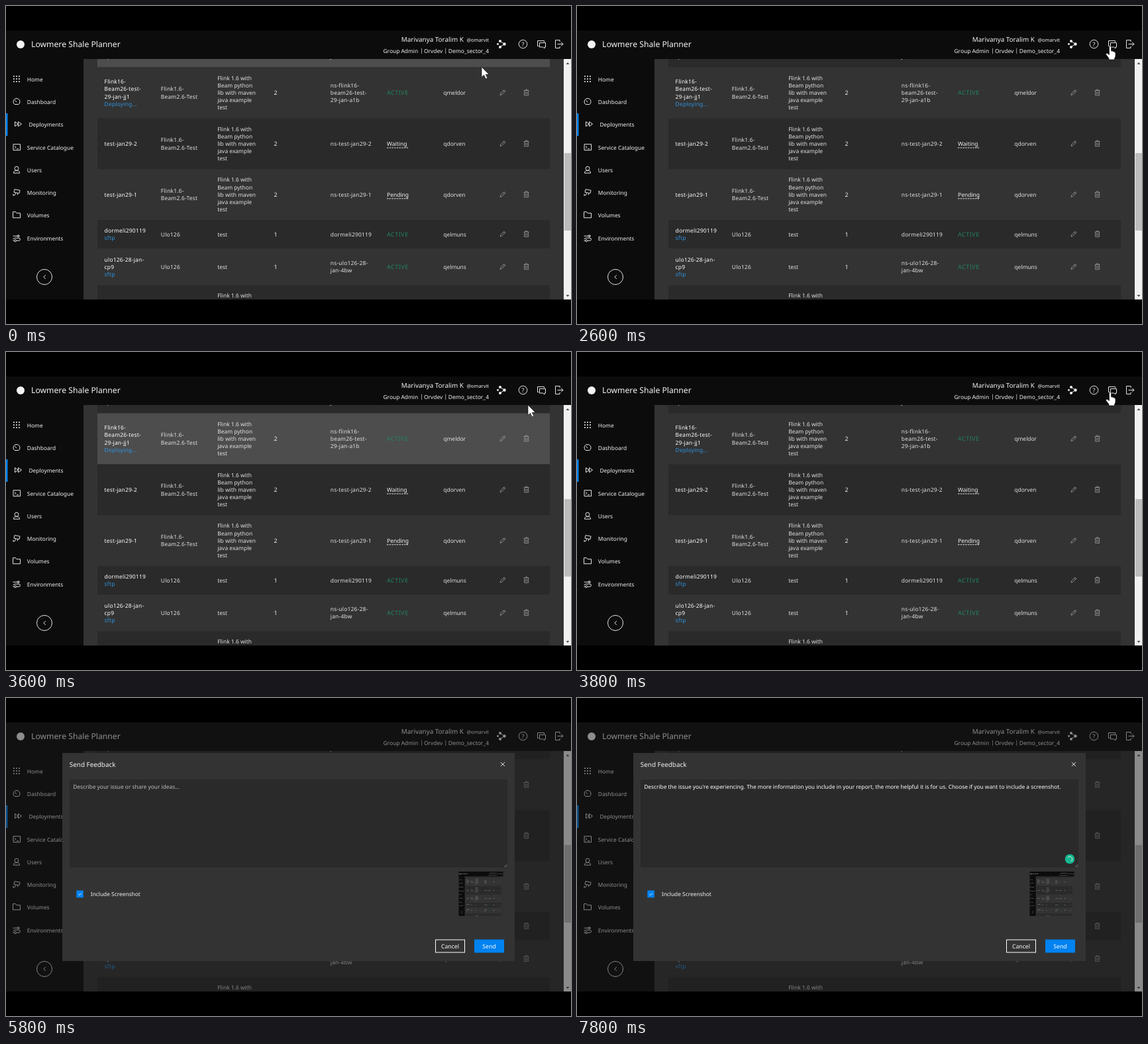
These frames come from a looping animation (853 by 480 pixels, 8 s). An HTML page:

```html
<!DOCTYPE html>
<html lang="en">
<head>
<meta charset="utf-8">
<title>Send feedback</title>
<style>
html, body { margin: 0; width: 100%; height: 100%; overflow: hidden; background: #000; }
svg { display: block; width: 100%; height: 100%; font-family: "Noto Sans", "Open Sans", sans-serif; text-rendering: geometricPrecision; }
text { white-space: pre; }
.line { fill: none; stroke: #e4e4e4; stroke-width: 1; }
.tool { fill: none; stroke: #a2a2a2; stroke-width: .8; }
</style>
</head>
<body>
<svg id="stage" viewBox="0 0 853 480"></svg>
<script>
const LOOP = 8000, STEP = 200;
const WHITE = '#f4f4f4', SOFT = '#e2e2e2', BLUE = '#0082f0', LINK = '#2f94e0', GREEN = '#21855d';
const LIGHT = '#333', DARK = '#2a2a2a', HOVER = '#4d4d4d', BASE = '#0c0c0c';

// y is the middle of the line
const text = (x, y, s, size = 8.4, fill = WHITE, more = '') =>
  `<text x="${x}" y="${y + size * .36}" font-size="${size}" fill="${fill}" ${more}>${s}</text>`;
const rect = (x, y, w, h, fill, more = '') =>
  `<rect x="${x}" y="${y}" width="${w}" height="${h}" fill="${fill}" ${more}/>`;
const path = (d, cls = 'line', more = '') => `<path class="${cls}" d="${d}" ${more}/>`;
const dot = (x, y, r, more = `fill="${WHITE}"`) => `<circle cx="${x}" cy="${y}" r="${r}" ${more}/>`;
const ring = (x, y, r) => dot(x, y, r, 'class="line"');
const at = (x, y, body) => `<g transform="translate(${x} ${y})">${body}</g>`;
const END = 'text-anchor="end"', MID = 'text-anchor="middle"', WIDE = 'letter-spacing=".2"';

// Header
function header() {
  const nodes = path('M746 53 752.5 57.5 746 62') +
    dot(746, 53, 2) + dot(752.5, 57.5, 2.2) + dot(746, 62, 2) + dot(742.5, 57.5, 1.4);
  const chat = path('M804.5 60.5H802.500V52.500H812.500V54.500M805.500 55.500H814.500V62H813V64L810.500 62H805.500Z');
  const exit = path('M836 54V51.500H829.500V63.500H836V61M832.500 57.500H841M838 54.500 841 57.500 838 60.500');
  return rect(0, 37, 853, 43, BASE) + dot(22, 58, 6) +
    text(38, 58, 'Lowmere Shale Planner', 12.2) +
    text(691, 50, 'Marivanya Toralim K', 9.9, WHITE, END) +
    text(729, 51, '@omarvit', 7.4, WHITE, END) +
    text(569.5, 67.5, 'Group Admin') + text(625, 67, '|') + text(631, 67.5, 'Orvdev') +
    text(661.500, 67, '|') + text(729, 67.5, 'Demo_sector_4', 8.5, WHITE, END) +
    nodes + ring(780.5, 57.5, 6.3) + text(780.5, 57.5, '?', 9, WHITE, MID) + chat + exit;
}

// Side menu, icons drawn around their own centre
const grid = [-4, 0, 4].map(x => [-4, 0, 4].map(y => rect(x - 1, y - 1, 1.8, 1.8, SOFT)).join('')).join('');
const menu = [
  ['Home', grid],
  ['Dashboard', path('M-3 4.300A5 5 0 1 1 3 4.300ZM0 1-2.500-2')],
  ['Deployments', path('M-2.500-3.500 2.500 0-2.500 3.500ZM2.500-3.500 7.500 0 2.500 3.500Z')],
  ['Service Catalogue', path('M-5-4.500H5.500V4.500H-5ZM-3-2-1 0-3 2M0 2.500H3')],
  ['Users', ring(0, -2, 3) + path('M-4.500 5C-4.500 1-2 1.500 0 1.500S4.500 1 4.500 5Z')],
  ['Monitoring', path('M-3-4.500 5-3 4 1.500-4 0ZM-1 1-3 4.500H-5.500M-5 2.500V5M1.500 1.500V4')],
  ['Volumes', path('M-5.500 4.500V-4.500H-1.500L0-2.500H5.500V4.500Z')],
  ['Environments', path('M-5.500-3H1M4.500-3H2M-2 0H3Q5.500 0 5.500 2T3 4H0M-5.500 4H-4M-2 0Q-5 0-5 2') +
    ring(2.5, -3, 1.5) + ring(-2, 4, 1.5)]
];
function sidebar() {
  const items = menu.map(([name, icon], i) => {
    const y = 111 + i * 34.22, on = i === 2;
    return text(on ? 34.4 : 31.8, y, name) + at(16, Math.round(y) - .8, icon);
  });
  return rect(0, 80, 117, 363, BASE) + rect(0, 162, 2.5, 34, BLUE) + items.join('') +
    ring(58, 409, 11.5) + path('M59.800 406 56.800 409 59.800 412');
}

// Table
const flink = ['Flink1.6-', 'Beam2.6-Test'];
const about = ['Flink 1.6 with', 'Beam python', 'lib with maven', 'java example', 'test'];
const rows = [
  { y: 92.5, h: 77, name: ['Flink16-', 'Beam26-test-', '29-jan-jj1'], note: 'Deploying...', kind: flink, info: about,
    n: 2, space: ['ns-flink16-', 'beam26-test-', '29-jan-a1b'], state: 'ACTIVE', owner: 'qmeldor' },
  { y: 169.5, h: 77, name: ['test-jan29-2'], kind: flink, info: about,
    n: 2, space: ['ns-test-jan29-2'], state: 'Waiting', owner: 'qdorven' },
  { y: 246.5, h: 76.5, name: ['test-jan29-1'], kind: flink, info: about,
    n: 2, space: ['ns-test-jan29-1'], state: 'Pending', owner: 'qdorven' },
  { y: 323, h: 43, name: ['dormeli290119'], note: 'sftp', kind: ['Ulo126'], info: ['test'],
    n: 1, space: ['dormeli290119'], state: 'ACTIVE', owner: 'qelmuns' },
  { y: 366, h: 55.5, name: ['ulo126-28-jan-', 'cp9'], note: 'sftp', kind: ['Ulo126'], info: ['test'],
    n: 1, space: ['ns-ulo126-28-', 'jan-4bw'], state: 'ACTIVE', owner: 'qelmuns' }
];
const cell = (x, mid, lines, fill, more) => lines.map((s, i) =>
  text(x, mid + (i - (lines.length - 1) / 2) * 11.2, s, 8.45, i === lines.note ? LINK : fill, more)).join('');
const pencil = path('M-4 4-3.300 1.500 2-3.800 3.800-2-1.500 3.300ZM.800-2.600 2.600-.800', 'tool');
const bin = path('M-3.800-3H3.800M-1.300-3V-4.300H1.300V-3M-3-3V4.300H3V-3M-1-1V2.700M1-1V2.700', 'tool');

function row(r, i) {
  const mid = r.y + r.h / 2;
  const name = r.note ? [...r.name, r.note] : [...r.name];
  if (r.note) name.note = name.length - 1;
  const active = r.state === 'ACTIVE';
  const state = active
    ? text(575, mid, r.state, 9, GREEN, 'letter-spacing=".5"')
    : text(575, mid, r.state, 8.5) +
      path(`M575 ${mid + 6}H607.500`, 'line', 'stroke-dasharray="2.500 1.200"');
  return rect(138, r.y, 683, r.h, i % 2 ? DARK : LIGHT, `id="row${i}"`) +
    cell(148.6, mid, name, '#fff', WIDE) + cell(233.8, mid, r.kind, SOFT, WIDE) +
    cell(319.2, mid, r.info, SOFT) + text(404.4, mid, r.n, 8.8) +
    cell(489.8, mid, r.space, SOFT, WIDE) + state +
    text(660.3, mid, r.owner, 8.45, SOFT) + at(750, mid - .5, pencil) + at(785.6, mid - .5, bin);
}
function table() {
  return rect(117, 80, 736, 363, LIGHT) + '<g clip-path="url(#view)">' +
    rect(138, 60, 683, 32.5, DARK, 'id="top"') +
    text(148.6, 76, 'cp4') + text(489.8, 76, 'jan') +
    rows.map(row).join('') + rect(138, 421.5, 683, 40, DARK) +
    cell(319.2, 459.8, about, SOFT) + '</g>';
}

const scroll = rect(842, 80, 11, 363, '#f1f1f1') + rect(843, 222, 10, 117, '#bdbdbd') +
  '<path fill="#505050" d="M845.500 88 848 85 850.500 88ZM845.500 436 848 439 850.500 436Z"/>';

// Dialog
function dialog() {
  const button = (x, label, look) => `<rect x="${x}" y="365" width="44" height="19" ${look}/>` +
    text(x + 22, 374.5, label, 8.7, '#fff', MID + ' font-weight="500"');
  return rect(85, 83, 683, 314, LIGHT) + text(95.8, 100, 'Send Feedback', 9.9) +
    path('M746.800 97 753 103M753 97 746.800 103') +
    rect(96, 123, 661, 133, DARK) + path('M752.500 255 756 251.500M754.800 255 756 253.800', 'tool') +
    text(101.2, 133.5, 'Describe your issue or share your ideas...', 8.35, '#bdbdbd', 'id="hint"') +
    text(101.2, 133.5, 'Describe the issue you\'re experiencing. The more information you include in your report, ' +
      'the more helpful it is for us. Choose if you want to include a screenshot.', 8.35, '#fff', 'id="typed"') +
    rect(0, 128, 1, 11, '#fff', 'id="caret"') +
    `<g id="badge">${dot(744, 243, 7.3, 'fill="#15b890"')}</g>` +
    `<g id="spin">${path('M740.800 240.500A4 4 0 0 1 746.500 246.200', 'line', 'stroke-width="1.300" stroke-linecap="round"')}</g>` +
    rect(106.3, 290.5, 10.5, 10.8, BLUE) + path('M109.300 296 111 297.700 114 294.500') +
    text(127.8, 296, 'Include Screenshot', 8.35) +
    '<use href="#app" transform="translate(683.500 262) scale(.0785 .165) translate(0 -37)"/>' +
    button(648.5, 'Cancel', 'fill="none" stroke="#fff"') +
    button(707.5, 'Send', `fill="${BLUE}" stroke="${BLUE}"`);
}

const pointer = '<g id="arrow"><path fill="#fff" stroke="#111" stroke-width=".7" d="M0 0V15.500L3.600 12.200 6.200 18 8.800 16.800 6.300 11.200H11.200Z"/></g>' +
  '<g id="hand"><path fill="#fff" stroke="#111" stroke-width=".7" d="M-1.500 1Q0-1 1.500 1V7.500Q3.200 6.500 4 8Q5.500 7.500 6.200 9Q8 8.500 8 10.500V14.500Q8 17 6.500 18.500V20.500H-2V18.500L-6.500 12.500Q-6.500 10-4 11L-1.500 13Z"/></g>';

const $ = id => document.getElementById(id);
$('stage').innerHTML = '<defs><clipPath id="view"><rect x="117" y="80" width="725" height="363"/></clipPath></defs>' +
  rect(0, 0, 853, 480, '#000') +
  `<g id="app">${table()}${header()}${sidebar()}</g>` + scroll +
  `<g id="modal">${rect(0, 37, 853, 406, '#181818', 'fill-opacity=".47"')}${dialog()}</g>` + pointer;

// time, x, y, shape
const moves = [
  [0, 718, 92, 'arrow'], [400, 731, 87, 'arrow'], [600, 753, 80, 'arrow'], [800, 775, 70.5, 'arrow'],
  [1000, 793, 65, 'arrow'], [1200, 803, 62, 'hand'], [1400, 805, 60.5, 'hand'],
  [2800, 802, 72, 'arrow'], [3000, 791, 97, 'arrow'], [3200, 786, 110, 'arrow'],
  [3400, 786, 98, 'arrow'], [3600, 788, 80, 'arrow'], [3800, 805, 60.5, 'hand'], [4200, 0, 0, 'none']
];
const show = (id, on) => $(id).setAttribute('visibility', on ? 'visible' : 'hidden');

function draw(now) {
  const t = Math.floor((now % LOOP) / STEP) * STEP;
  const within = (a, b) => t >= a && t < b;
  const [, x, y, shape] = moves.filter(m => m[0] <= t).pop();
  for (const id of ['arrow', 'hand']) {
    show(id, id === shape);
    $(id).setAttribute('transform', `translate(${x} ${y})`);
  }
  $('top').setAttribute('fill', t < 800 ? HOVER : DARK);
  $('row0').setAttribute('fill', within(3000, 3800) ? HOVER : LIGHT);
  $('modal').setAttribute('opacity', t < 4000 ? 0 : t < 4200 ? .5 : 1);

  const typed = t >= 7200;
  show('hint', !typed);
  show('typed', typed);
  show('badge', t >= 6800);
  show('spin', typed);
  show('caret', within(6600, 7800));
  $('caret').setAttribute('x', typed ? 734 : 101);
  $('spin').setAttribute('transform', `rotate(${(t - 7800) / STEP * 100} 744 243)`);
}

const start = performance.now();
function tick() {
  draw(performance.now() - start);
  requestAnimationFrame(tick);
}
tick();
</script>
</body>
</html>
```
